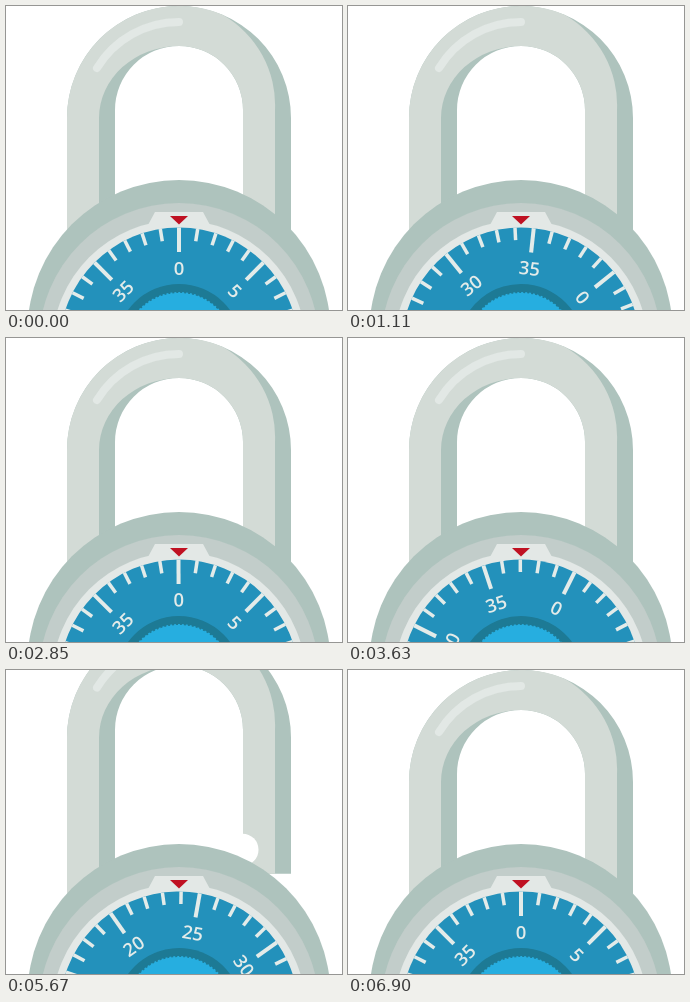
Animation of 336 by 304 pixels, one loop 7200 ms. Source, as an HTML page:

```html
<!DOCTYPE html>
<html lang="en">
<head>
<meta charset="utf-8">
<title>Combination lock</title>
<style>
  html, body { margin: 0; width: 100%; height: 100%; overflow: hidden; background: #fff; }
  svg { display: block; width: 336px; height: 304px; }
  text {
    font-family: "Open Sans", "Noto Sans", sans-serif;
    font-size: 18.5px;
    font-weight: 600;
    font-stretch: 75%;
    text-anchor: middle;
    fill: #e3ebe9;
  }
</style>
</head>
<body>
<svg viewBox="0 0 336 304">
  <g id="shackle">
    <path fill="#aec3bd" d="M61 380V112A112 112 0 0 1 285 112V248H237V104A64 64 0 0 0 109 104V380Z"/>
    <path fill="#d3dbd6" d="M61 380V112A112 112 0 0 1 217 9A104 104 0 0 1 269 104V248H237V104A64 64 0 0 0 173 40A80 72 0 0 0 93 112V380Z"/>
    <path fill="none" stroke="#e2e8e5" stroke-width="8" stroke-linecap="round" d="M91 62A96 96 0 0 1 173 16"/>
    <path fill="#fff" d="M236.5 208A16 16 0 0 1 236.5 240Z"/>
  </g>

  <circle cx="173" cy="325.5" r="151.5" fill="#aec3bd"/>
  <circle cx="173" cy="337" r="140" fill="#c2cdca"/>
  <circle cx="173" cy="341" r="127" fill="#e3e8e6"/>
  <path fill="#e3e8e6" d="M149 206H197L204 219H142Z"/>
  <path fill="#bf1122" d="M164 210H182L173 218.5Z"/>

  <g transform="translate(173 341)">
    <g id="dial">
      <circle r="119.5" fill="#2391bb"/>
      <g id="marks" stroke="#e3ebe9"></g>
      <g id="numbers"></g>
      <circle r="63" fill="#1d7a95"/>
      <circle r="55" fill="#26aee0"/>
      <circle r="55" fill="none" stroke="#1d7a95" stroke-width="2" stroke-dasharray="2 2"/>
    </g>
  </g>
</svg>
<script>
  const LOOP = 7200;
  const $ = id => document.getElementById(id);

  // Each move: start ms, end ms, from, to
  const TURNS = [
    [60, 1800, 0, -450],
    [1935, 3250, -450, -340],
    [3370, 4870, -340, -230],
    [5400, 6900, -230, 0]
  ];
  const LIFTS = [
    [4355, 5135, 0, -60],
    [5400, 6150, -60, 0]
  ];

  function add(parent, tag, attrs, text = "") {
    const el = document.createElementNS("http://www.w3.org/2000/svg", tag);
    for (const key in attrs) el.setAttribute(key, attrs[key]);
    el.textContent = text;
    parent.append(el);
  }

  for (let n = 0; n < 40; n++) {
    const major = n % 5 === 0;
    const transform = `rotate(${n * 9})`;
    add($("marks"), "line", {
      y1: -119.5, y2: major ? -95 : -107, "stroke-width": major ? 4 : 3.5, transform
    });
    if (major) add($("numbers"), "text", { y: -72.5, transform }, String(n));
  }

  const ease = p => p < 0.5 ? 2 * p * p : 1 - 2 * (1 - p) ** 2;

  function valueAt(moves, t) {
    let value = moves[0][2];
    for (const [start, end, from, to] of moves) {
      if (t < start) break;
      value = from + (to - from) * ease(Math.min(1, (t - start) / (end - start)));
    }
    return value;
  }

  const begin = performance.now();

  function draw() {
    const t = (performance.now() - begin) % LOOP;
    $("dial").setAttribute("transform", `rotate(${valueAt(TURNS, t)})`);
    $("shackle").setAttribute("transform", `translate(0 ${valueAt(LIFTS, t)})`);
    requestAnimationFrame(draw);
  }
  draw();
</script>
</body>
</html>
```
